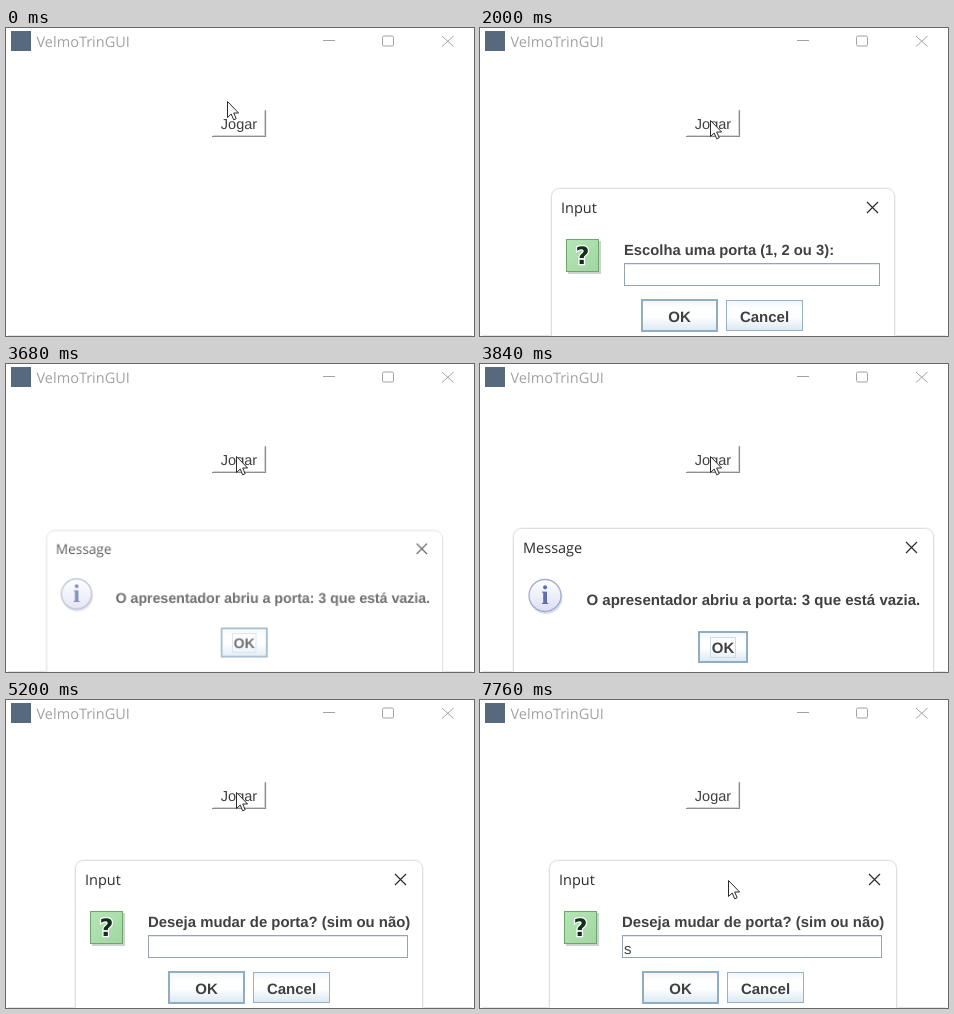
Recreate the animation shown at these times as an HTML page. Size 468x308 px, loop 8000 ms.

```html
<!DOCTYPE html>
<html lang="pt">
<head>
<meta charset="utf-8">
<title>VelmoTrinGUI</title>
<style>
  html, body { margin: 0; width: 100%; height: 100%; overflow: hidden; background: #fff; }
  svg { display: block; width: 468px; height: 308px; }
  text { text-rendering: geometricPrecision; fill: #404040; }
  .title { font: 14.5px "Open Sans", "Noto Sans", sans-serif; fill: #2c2c2c; }
  .plain { font: 15px "Liberation Sans", Arial, sans-serif; }
  .bold { font: bold 15px "Liberation Sans", Arial, sans-serif; }
  .mid { text-anchor: middle; }
  .line { fill: none; stroke: #2c2c2c; stroke-width: 1.2; }

  .anim { animation: 8s step-end infinite; }
  .dialog { opacity: 0; transform-origin: 160px 205px; }
  #pick { animation-name: pick; }
  #notice { animation-name: notice; }
  #swap { animation-name: swap; }
  #pointer { animation-name: pointer; }
  .press, .typed, .caret { opacity: 0; }
  #pick .press { animation-name: press; }
  #pick .typed { animation-name: digit; }
  #pick .caret { animation-name: caretPick; }
  #swap .typed { animation-name: letter; }
  #swap .caret { animation-name: caretSwap; }

  /* 1% = 80 ms */
  @keyframes pick {
    0%, 46%, 100% { opacity: 0; }
    17% { opacity: .75; transform: scale(.942); }
    18% { opacity: .93; transform: scale(.988); }
    19% { opacity: 1; transform: none; }
  }
  @keyframes notice {
    0%, 65%, 100% { opacity: 0; }
    46% { opacity: .75; transform: scale(.942); }
    47% { opacity: .93; transform: scale(.988); }
    48% { opacity: 1; transform: none; }
  }
  @keyframes swap { 0% { opacity: 0; } 65%, 100% { opacity: 1; } }
  @keyframes press { 0%, 46%, 100% { opacity: 0; } 44% { opacity: 1; } }
  @keyframes digit { 0%, 46%, 100% { opacity: 0; } 31% { opacity: 1; } }
  @keyframes letter { 0% { opacity: 0; } 94%, 100% { opacity: 1; } }
  @keyframes caretPick {
    0%, 25%, 39%, 100% { opacity: 0; }
    17%, 29% { opacity: 1; transform: none; }
    31% { opacity: 1; transform: translateX(8px); }
  }
  @keyframes caretSwap {
    0%, 75%, 89%, 97%, 100% { opacity: 0; }
    68%, 84% { opacity: 1; transform: none; }
    94% { opacity: 1; transform: translateX(8px); }
  }
  @keyframes pointer {
    0% { transform: translate(221px, 73px); }
    1% { transform: translate(221px, 75px); }
    2% { transform: translate(220.5px, 78px); }
    3% { transform: translate(220px, 80px); }
    8% { transform: translate(230px, 92px); }
    82% { transform: translate(245px, 204px); }
    84% { transform: translate(247px, 193px); }
    85% { transform: translate(248px, 185px); }
    86%, 100% { transform: translate(248px, 180px); }
  }
</style>
</head>
<body>
<svg id="stage" viewBox="0 0 468 308">
  <defs>
    <linearGradient id="face" x2="0" y2="1">
      <stop offset="0" stop-color="#f1f6fa"/>
      <stop offset=".3" stop-color="#fff"/>
      <stop offset=".55" stop-color="#fdfeff"/>
      <stop offset="1" stop-color="#dbe8f2"/>
    </linearGradient>
    <linearGradient id="orb" x2="0" y2="1">
      <stop offset="0" stop-color="#fff"/>
      <stop offset="1" stop-color="#dcdff3"/>
    </linearGradient>
    <linearGradient id="leaf" x2="1" y2="1">
      <stop offset="0" stop-color="#b4e6b4"/>
      <stop offset="1" stop-color="#a0d6a2"/>
    </linearGradient>
  </defs>

  <rect width="468" height="308" fill="#fff"/>
  <path d="M2 307.5H466" stroke="#e4e4e4"/>
  <rect x="5" y="3" width="20" height="20" fill="#56697d"/>
  <text class="title" x="30.5" y="19" style="fill:#a2a2a2">VelmoTrinGUI</text>
  <g class="line" style="stroke:#a2a2a2;stroke-width:1">
    <path d="M317 12.5H329M436 8L447.5 18.5M447.5 8L436 18.5"/>
    <rect x="376.5" y="8" width="11" height="10" rx="1.5"/>
  </g>

  <path d="M206 108.5H259.5V82" fill="none" stroke="#8c8c8c" stroke-width="1.2"/>
  <path d="M207 107.5H258.5V83" fill="none" stroke="#d4d4d4"/>
  <text class="plain mid" x="233" y="101" style="font-size:14.5px">Jogar</text>

  <g id="dialogs"></g>

  <path id="pointer" class="anim" d="M.5 .5V16.5L4.2 13L6.7 18.8L9.2 17.7L6.7 12H11.6Z"
        fill="#fff" stroke="#2a2a2a" stroke-linejoin="round"/>
</svg>
<script>
  const box = (x, y, w, h, look) =>
    `<rect x="${x}" y="${y}" width="${w}" height="${h}" ${look}/>`;

  const label = (x, y, cls, str, size = 15) =>
    `<text class="${cls}" x="${x}" y="${y}" style="font-size:${size}px">${str}</text>`;

  function frame(left, top, right, name, nameY) {
    const cx = right - 22, cy = top + 19;
    const rim = (d, color) => box(left - d, top - d, right - left + 2 * d, 200,
      `rx="${8 + d}" fill="#fff" stroke="${color}"`);
    return rim(1, '#f6f6f6') + rim(0, '#dedede') +
      label(left + 9.5, nameY, 'title', name, 14.5) +
      `<path class="line" d="M${cx - 5.5} ${cy - 5.5}l11 11m0-11l-11 11"/>`;
  }

  function button(x, y, w, h, str, main) {
    const rim = main ? 'stroke="#8fadc4" stroke-width="2"' : 'stroke="#98b1c5"';
    const pressed = main
      ? box(x + 1, y + 1, w - 2, h - 2, 'class="press anim" fill="#b8cfe5"') : '';
    return box(x, y, w, h, `fill="url(#face)" ${rim}`) + pressed +
      label(x + w / 2, y + h / 2 + 6, 'bold mid', str);
  }

  const question = x =>
    box(x + 2, 213, 33, 33, 'fill="#ccd2cc"') +
    box(x + .5, 211.5, 32, 32, 'fill="url(#leaf)" stroke="#6fa670"') +
    `<text x="${x + 16.5}" y="236" class="mid" style="font:bold 24px 'DejaVu Sans',sans-serif;` +
    `fill:#10301a;stroke:#fff;stroke-width:2.5px;paint-order:stroke">?</text>`;

  const info =
    '<circle cx="66" cy="233.5" r="16.5" fill="#dcdee6"/>' +
    '<circle cx="65" cy="231.5" r="16" fill="url(#orb)" stroke="#a3abd2" stroke-width="1.3"/>' +
    `<text x="65" y="240" class="mid" style="font:bold 27px 'Liberation Serif',serif;fill:#606eaa">i</text>`;

  // Input dialogs share one layout; d widens the window on both sides.
  function ask(id, d, prompt, size, typed) {
    const x = 144 - d, b = d / 2;
    return `<g id="${id}" class="dialog anim">` +
      frame(71.5 - d, 160.5, 414.5 + d, 'Input', 185) +
      question(86 - d) +
      label(x, 227, 'bold', prompt, size) +
      box(x + .5, 235.5, 255 + 2 * d, 22, 'fill="#fff" stroke="#94a4b2"') +
      `<path d="M${x + 1} 236.5h${254 + 2 * d}" stroke="#e2e9ef"/>` +
      label(x + 2, 254, 'plain typed anim', typed) +
      box(x + 2, 237, 1.2, 20, 'class="caret anim" fill="#222"') +
      button(162 + b, 272, 75, 31, 'OK', true) +
      button(246.5 + b, 272.5, 76, 30, 'Cancel') + '</g>';
  }

  const notice = '<g id="notice" class="dialog anim">' +
    frame(33.5, 164.5, 453.5, 'Message', 189) + info +
    label(106.5, 241, 'bold', 'O apresentador abriu a porta: 3 que está vazia.', 15.03) +
    button(219, 268, 48, 30, 'OK', true) +
    box(230.5, 273.5, 25, 20, 'fill="none" stroke="#cddcea"') + '</g>';

  document.getElementById('dialogs').innerHTML =
    ask('pick', 0, 'Escolha uma porta (1, 2 ou 3):', 14.77, '1') +
    notice +
    ask('swap', 2, 'Deseja mudar de porta? (sim ou não)', 14.9, 's');
</script>
</body>
</html>
```
